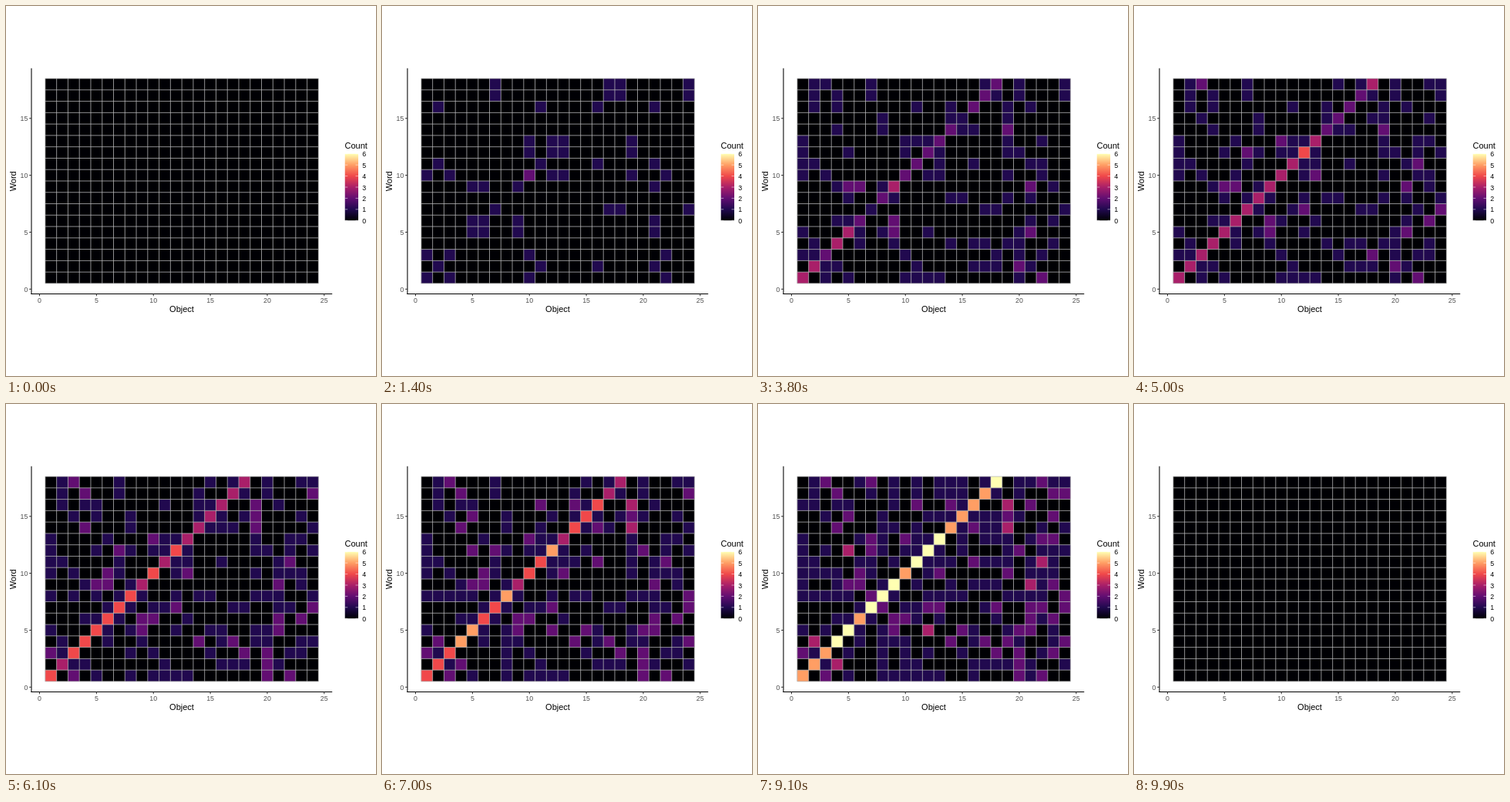
These frames come from a looping animation (480x480 px, 10000 ms). An HTML page with a canvas:

```html
<!DOCTYPE html>
<html lang="en">
<head>
<meta charset="utf-8">
<title>Word and object counts</title>
<style>
  html, body { margin: 0; width: 100%; height: 100%; overflow: hidden; background: #fff; }
  canvas { display: block; width: 480px; height: 480px; }
</style>
</head>
<body>
<canvas id="stage" width="480" height="480"></canvas>
<script>
const ctx = document.getElementById('stage').getContext('2d');
const LOOP = 10000, COLS = 24, ROWS = 18, UNIT = 14.77;
const FONT = '"Liberation Sans", Arial, sans-serif';
const COLORS = ['#000004', '#21094f', '#620e72', '#a91f69', '#f0484a', '#ff9e64', '#ffffb2'];

// Each trial shows four objects (a = 1 ... x = 24); those up to r = 18 are also named.
const TRIALS = (
  'acjv gqrx bkpu efiu jlms bdqt hnos aelt dfiw ' +
  'dnps bcrt akmv ehiu gklv corw ghlx fjmw ' +
  'acht dnqx eops fgju ' +
  'bdhx elot knps ikqw gmru inrv moqw ' +
  'bdjs celw ghmv aipu fkrv ' +
  'afnt bjox cpqx'
).split(' ').map(s => [...s].map(ch => ch.charCodeAt(0) - 96));

const px = v => 43.5 + v * UNIT;
const py = v => 367.3 - v * UNIT;

function trialsAt(t) {
  let n;
  if (t < 200) n = 0;
  else if (t < 5200) n = 1 + Math.floor((t - 200) / 300);
  else if (t < 8100) n = 18 + Math.floor((t - 5200) / 300);
  else n = 28 + Math.floor((t - 8100) / 200);
  return n > TRIALS.length ? 0 : n;
}

function countsAfter(n) {
  const grid = Array.from({ length: ROWS + 1 }, () => new Array(COLS + 1).fill(0));
  for (const trial of TRIALS.slice(0, n)) {
    for (const word of trial) {
      if (word > ROWS) continue;
      for (const obj of trial) grid[word][obj]++;
    }
  }
  return grid;
}

function line(x1, y1, x2, y2, color, width) {
  ctx.strokeStyle = color;
  ctx.lineWidth = width;
  ctx.beginPath();
  ctx.moveTo(x1, y1);
  ctx.lineTo(x2, y2);
  ctx.stroke();
}

function label(text, x, y, size, color, align) {
  ctx.font = size + 'px ' + FONT;
  ctx.fillStyle = color;
  ctx.textAlign = align;
  ctx.fillText(text, x, y);
}

function drawTiles(grid) {
  const left = px(0.5), right = px(COLS + 0.5), top = py(ROWS + 0.5), bottom = py(0.5);
  ctx.fillStyle = COLORS[0];
  ctx.fillRect(left, top, right - left, bottom - top);
  for (let r = 1; r <= ROWS; r++) {
    for (let c = 1; c <= COLS; c++) {
      if (!grid[r][c]) continue;
      ctx.fillStyle = COLORS[grid[r][c]];
      ctx.fillRect(px(c - 0.5), py(r + 0.5), UNIT, UNIT);
    }
  }
  for (let c = 0; c <= COLS; c++) line(px(c + 0.5), top, px(c + 0.5), bottom, '#bebebe', 0.75);
  for (let r = 0; r <= ROWS; r++) line(left, py(r + 0.5), right, py(r + 0.5), '#bebebe', 0.75);
}

function drawAxes() {
  line(33, 80.7, 33, 374, '#000', 1.07);
  line(32.5, 373.5, 423.2, 373.5, '#000', 1.07);
  for (let v = 0; v <= 25; v += 5) {
    line(px(v), 373.5, px(v), 376.3, '#333', 1.07);
    label(v, px(v), 385, 8.8, '#4d4d4d', 'center');
    if (v > 15) continue;
    line(30.2, py(v), 33, py(v), '#333', 1.07);
    label(v, 28.3, py(v) + 3.2, 8.8, '#4d4d4d', 'right');
  }
  label('Object', 228, 397, 11, '#000', 'center');
  ctx.save();
  ctx.translate(13.3, 227.3);
  ctx.rotate(-Math.PI / 2);
  label('Word', 0, 0, 11, '#000', 'center');
  ctx.restore();
}

function drawLegend() {
  const x = 439.7, w = 17.3, top = 191.8, bottom = 278.2;
  label('Count', 439.5, 185, 11, '#000', 'left');
  const ramp = ctx.createLinearGradient(0, bottom, 0, top);
  COLORS.forEach((color, i) => ramp.addColorStop(i / 6, color));
  ctx.fillStyle = ramp;
  ctx.fillRect(x, top, w, bottom - top);
  for (let i = 0; i <= 6; i++) {
    const y = bottom - (bottom - top) * i / 6;
    line(x, y, x + 3.5, y, '#fff', 0.5);
    line(x + w - 3.5, y, x + w, y, '#fff', 0.5);
    label(i, 462.3, y + 3.5, 8.8, '#000', 'left');
  }
}

let shown = -1;
function frame() {
  const n = trialsAt(performance.now() % LOOP);
  if (n !== shown) {
    shown = n;
    ctx.fillStyle = '#fff';
    ctx.fillRect(0, 0, 480, 480);
    drawTiles(countsAfter(n));
    drawAxes();
    drawLegend();
  }
  requestAnimationFrame(frame);
}
frame();
</script>
</body>
</html>
```
